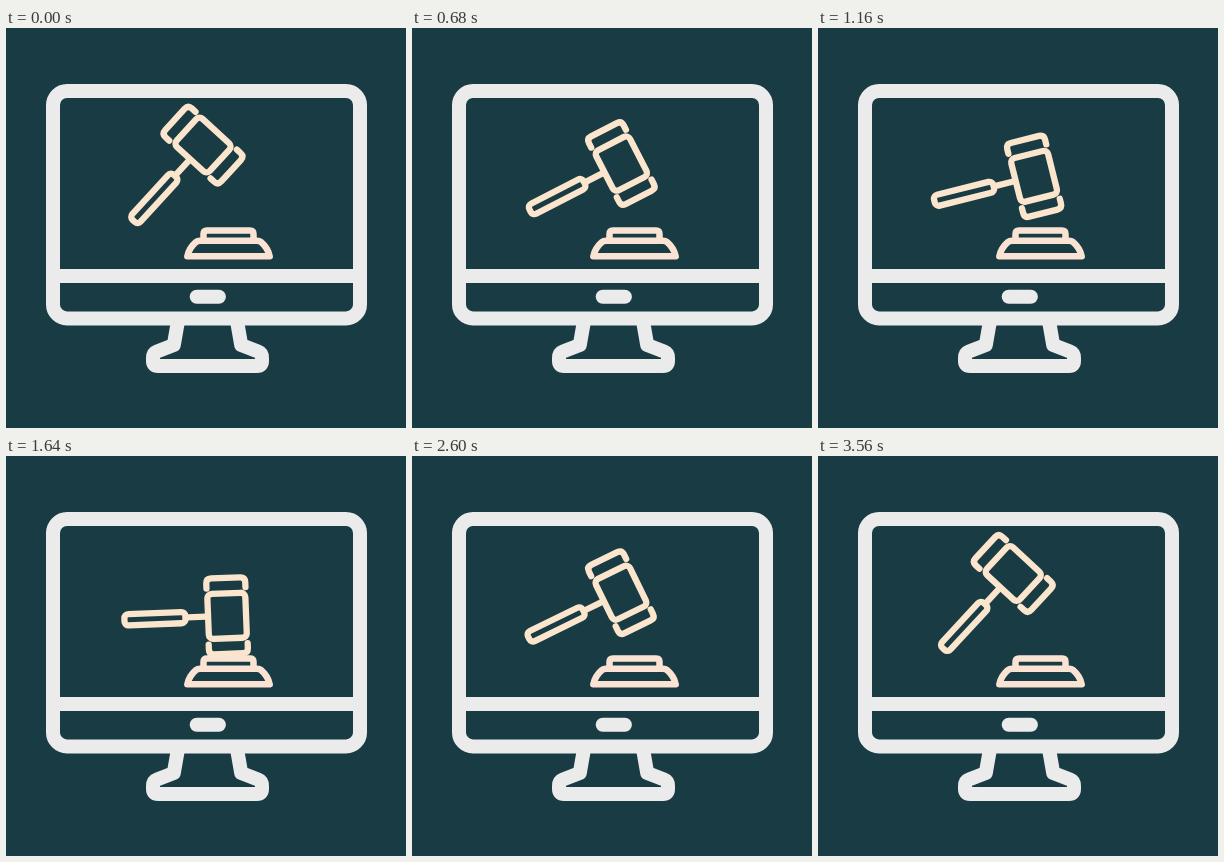
An HTML page for the animation above (3600 ms loop, 400x400 px).

```html
<!DOCTYPE html>
<html lang="en">
<head>
<meta charset="utf-8">
<title>Online auction</title>
<style>
  html, body { margin: 0; width: 100%; height: 100%; overflow: hidden; background: #183b44; }
  svg { display: block; width: 100vw; height: 100vh; }
</style>
</head>
<body>
<svg viewBox="0 0 400 400" fill="none" stroke-linejoin="round">
  <g stroke="#ebebeb" stroke-width="14">
    <rect x="47" y="63" width="307" height="227.400" rx="14"/>
    <path d="M47 248H354"/>
    <rect x="183.700" y="261.800" width="36.200" height="14" rx="7" fill="#ebebeb" stroke="none"/>
    <path id="stand" d="M172 293L167.800 317L151 323.500Q147 325 147 330V333Q147 338 152 338H202"/>
    <use href="#stand" transform="matrix(-1 0 0 1 403 0)"/>
  </g>
  <g stroke="#fbe3d3" stroke-width="6.500">
    <path d="M197.500 212V206Q197.500 202.400 201 202.400H244Q247.500 202.400 247.500 206V212"/>
    <path d="M181.300 228.300Q183 220 190 214Q191.500 212.700 194 212.700H251Q253.500 212.700 255 214Q262 220 263.700 228.300Z"/>
  </g>
  <!-- Gavel, drawn upright around its anchor near the head -->
  <g id="gavel" stroke="#fbe5cc" stroke-width="6.300" stroke-linecap="round">
    <rect x="-80.300" y="-5.600" width="61" height="11.200" rx="4"/>
    <path d="M-17 0H1"/>
    <rect x="3.400" y="-22.500" width="38" height="45" rx="4.500"/>
    <path id="cap" d="M2.900 -28V-33Q2.900 -38 7.900 -38H36.900Q41.900 -38 41.900 -33V-28"/>
    <use href="#cap" transform="scale(1 -1)"/>
  </g>
</svg>
<script>
  const LOOP = 3600, HIT = 1630;
  const raised = { x: 181.9, y: 133.6, tilt: 47.6 };
  const struck = { x: 198.8, y: 160.9, tilt: 2 };
  const recoiled = { x: 179.7, y: 133.4, tilt: 48 };
  const gavel = document.getElementById('gavel');

  const easeOut = s => s + 0.12 * s * (1 - s);

  function place(from, to, progress) {
    const k = easeOut(progress);
    const mix = key => from[key] + (to[key] - from[key]) * k;
    gavel.setAttribute('transform', `translate(${mix('x')} ${mix('y')}) rotate(${-mix('tilt')})`);
  }

  function draw() {
    const time = performance.now() % LOOP;
    if (time < HIT) place(raised, struck, time / HIT);
    else place(struck, recoiled, (time - HIT) / (LOOP - HIT));
    requestAnimationFrame(draw);
  }
  draw();
</script>
</body>
</html>
```
